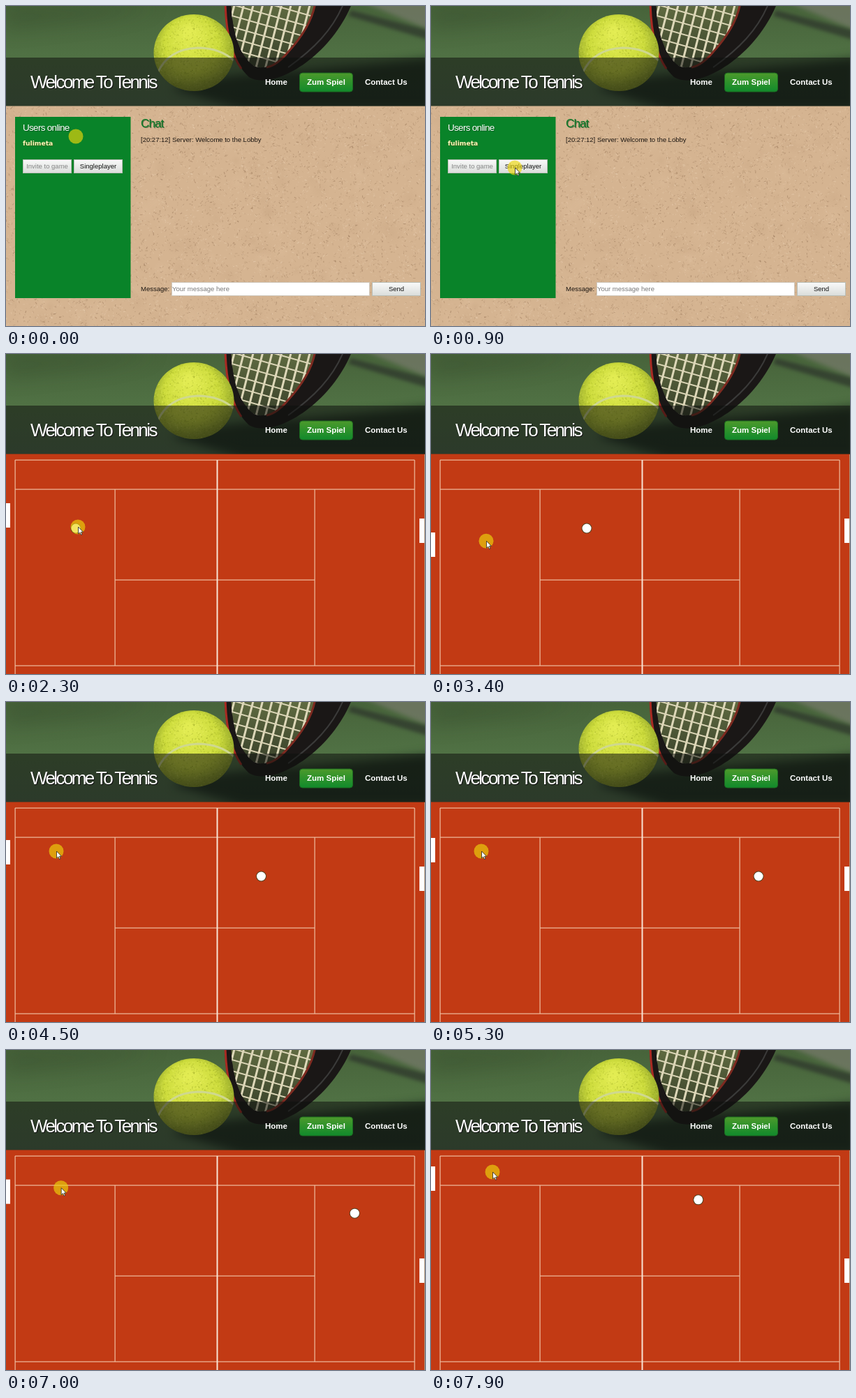
Recreate the animation shown at these times as an HTML page with a canvas. Size 600 by 459 pixels, loop 8000 ms.

```html
<!DOCTYPE html>
<html lang="de">
<head>
<meta charset="utf-8">
<title>Tennis</title>
<style>
html, body { margin: 0; width: 100%; height: 100%; overflow: hidden; }
canvas { display: block; width: 600px; height: 459px; }
</style>
</head>
<body>
<canvas id="stage" width="600" height="459"></canvas>
<script>
const W = 600, H = 459, LOOP = 8000, HEADER = 143.5;
const SANS = '"Liberation Sans", Arial, sans-serif';
const stage = document.getElementById('stage').getContext('2d');

// Seeded random numbers keep the paper grain identical on every load.
let seed = 7;
function random() {
  seed = (seed * 1664525 + 1013904223) % 4294967296;
  return seed / 4294967296;
}

function layer(draw) {
  const canvas = document.createElement('canvas');
  canvas.width = W;
  canvas.height = H;
  draw(canvas.getContext('2d'));
  return canvas;
}

function vertical(c, y0, y1, ...colors) {
  const g = c.createLinearGradient(0, y0, 0, y1);
  colors.forEach((color, i) => g.addColorStop(i / (colors.length - 1), color));
  return g;
}

function rect(c, x, y, w, h, fill) {
  c.fillStyle = fill;
  c.fillRect(x, y, w, h);
}

function disc(c, x, y, r, fill) {
  c.fillStyle = fill;
  c.beginPath();
  c.arc(x, y, r, 0, Math.PI * 2);
  c.fill();
}

function line(c, x0, y0, x1, y1) {
  c.beginPath();
  c.moveTo(x0, y0);
  c.lineTo(x1, y1);
  c.stroke();
}

function shape(c, path, fill) {
  c.fillStyle = fill;
  c.fill(new Path2D(path));
}

function curve(c, path, color, width) {
  c.strokeStyle = color;
  c.lineWidth = width;
  c.stroke(new Path2D(path));
}

function blurred(c, radius, color, path) {
  c.save();
  c.filter = `blur(${radius}px)`;
  shape(c, path, color);
  c.restore();
}

function text(c, str, x, y, size, color, options = {}) {
  const { weight = 'normal', spacing = 0, align = 'left', shadow, family = SANS } = options;
  c.save();
  c.font = `${weight} ${size}px ${family}`;
  c.letterSpacing = spacing + 'px';
  c.fontKerning = 'normal';
  c.textAlign = align;
  if (shadow) {
    c.fillStyle = shadow;
    c.fillText(str, x + 1, y + 1);
  }
  c.fillStyle = color;
  c.fillText(str, x, y);
  c.restore();
}

function drawRacket(c) {
  const strings = 'M322 -5 C324 35 332 66 352 84 C366 94 387 86 404 66 C426 43 440 18 443 -5 Z';
  shape(c, 'M313 -5 C314 40 324 80 348 102 C380 122 464 76 496 -5 Z', '#1a1716');
  curve(c, 'M314 -5 C315 38 323 70 337 90', '#a82a22', 3);
  curve(c, 'M484 -5 C468 35 440 62 404 88', '#3a3a39', 2);

  c.save();
  c.clip(new Path2D(strings));
  shape(c, strings, vertical(c, 0, 90, '#5f6a40', '#38402a'));
  c.strokeStyle = '#ddd7b8';
  c.lineWidth = 3;
  for (let i = 0; i < 11; i++) line(c, 328 + i * 13.5, -5, 301 + i * 13.5, 100);
  c.lineWidth = 2;
  for (let i = 0; i < 8; i++) line(c, 310, -22 + i * 16, 450, 18 + i * 16);
  c.restore();
  curve(c, 'M443 -5 C439 20 425 43 404 66 C394 78 384 86 373 88', '#7d2a20', 3);
}

function drawPhotoBall(c) {
  const g = c.createRadialGradient(262, 36, 5, 268, 66, 62);
  g.addColorStop(0, '#e2ec52');
  g.addColorStop(0.6, '#ccdb3c');
  g.addColorStop(1, '#94a72b');
  c.save();
  c.fillStyle = g;
  c.beginPath();
  c.ellipse(269, 67, 57.5, 55, 0, 0, Math.PI * 2);
  c.fill();
  c.clip();
  for (let i = 0; i < 1300; i++) {
    const tone = random() < 0.5 ? 'rgba(247,252,125,.2)' : 'rgba(105,125,15,.18)';
    rect(c, 210 + random() * 118, 11 + random() * 113, 1.5, 1.5, tone);
  }
  blurred(c, 9, 'rgba(60,70,20,.35)', 'M205 104 Q265 126 330 88 V130 H205 Z');
  curve(c, 'M217 96 C228 72 247 61 274 60 C296 60 314 66 328 80', '#cfd88f', 3);
  c.restore();
}

const header = layer(c => {
  c.save();
  c.beginPath();
  c.rect(0, 0, W, HEADER);
  c.clip();
  rect(c, 0, 0, W, HEADER, vertical(c, 0, HEADER, '#47633a', '#507144', '#4f6b4b'));
  blurred(c, 14, 'rgba(30,45,25,.2)', 'M0 0 H220 L140 18 L0 34 Z');
  blurred(c, 3, 'rgba(118,122,106,.75)', 'M505 -8 H610 V36 Z');
  blurred(c, 2.5, 'rgba(45,52,44,.7)', 'M494 6 L610 36 V50 L490 14 Z');
  blurred(c, 7, 'rgba(10,20,14,.65)', 'M238 119 C300 92 410 98 610 74 V150 H340 Z');
  drawRacket(c);
  drawPhotoBall(c);
  rect(c, 0, 74, W, 70, 'rgba(14,16,14,.53)');
  c.restore();

  text(c, 'Welcome To Tennis', 35, 118, 26, '#fff', { spacing: -2.6, shadow: '#111' });
  const nav = { weight: 'bold' };
  text(c, 'Home', 371, 113, 11.5, '#fff', nav);
  c.beginPath();
  c.roundRect(420.5, 96, 76, 27, 4);
  c.fillStyle = vertical(c, 96, 123, '#4d9a2c', '#2d922b', '#128a2c');
  c.fill();
  c.strokeStyle = '#1c6a20';
  c.lineWidth = 1;
  c.stroke();
  text(c, 'Zum Spiel', 431, 113, 11.5, '#fff', nav);
  text(c, 'Contact Us', 514, 113, 11.5, '#fff', nav);
});

function drawPaper(c) {
  rect(c, 0, 143, W, H - 143, '#d5b491');
  for (let i = 0; i < 160; i++) {
    const x = random() * W, y = 144 + random() * 315, r = 6 + random() * 12;
    const g = c.createRadialGradient(x, y, 0, x, y, r);
    const rgb = random() < 0.5 ? '234,205,173' : '185,150,116';
    g.addColorStop(0, `rgba(${rgb},.14)`);
    g.addColorStop(1, `rgba(${rgb},0)`);
    disc(c, x, y, r, g);
  }
  for (let i = 0; i < 8500; i++) {
    const x = random() * W, y = 144 + random() * 315;
    const angle = random() * 6.3, size = 0.7 + random() * 3;
    c.strokeStyle = random() < 0.6
      ? `rgba(125,92,64,${0.1 + random() * 0.3})`
      : `rgba(240,217,190,${0.2 + random() * 0.3})`;
    c.lineWidth = 0.6 + random() * 0.6;
    line(c, x, y, x + Math.cos(angle) * size, y + Math.sin(angle) * size);
  }
}

function drawButton(c, label, x, y, w, color) {
  rect(c, x, y, w, 20, vertical(c, y, y + 20, '#fafafa', '#d9dcda'));
  c.strokeStyle = '#b9beb7';
  c.lineWidth = 1;
  c.strokeRect(x + 0.5, y + 0.5, w - 1, 19);
  text(c, label, x + w / 2, y + 13, 9.5, color, { align: 'center' });
}

const lobby = layer(c => {
  drawPaper(c);
  rect(c, 13, 159, 165.5, 260, '#098329');
  text(c, 'Users online', 24, 178.5, 13.5, '#fff', { spacing: -0.7, shadow: '#075d1f' });
  text(c, 'fulimeta', 24, 200, 9.2, '#fbf6bb',
    { weight: 'bold', shadow: '#3c6a1c', family: '"DejaVu Sans", Verdana, sans-serif' });
  drawButton(c, 'Invite to game', 24, 220, 70, '#858585');
  drawButton(c, 'Singleplayer', 97, 220, 70, '#111');

  text(c, 'Chat', 193, 174, 17, '#0b7a28', { spacing: -0.9, shadow: 'rgba(40,75,35,.7)' });
  text(c, '[20:27:12] Server: Welcome to the Lobby', 193, 195, 9.5, '#1d1712');
  text(c, 'Message:', 193, 409, 9.5, '#1d1712');
  rect(c, 237, 396, 284, 20, '#fff');
  c.strokeStyle = '#cfc8bd';
  c.strokeRect(237.5, 396.5, 283, 19);
  text(c, 'Your message here', 238, 409, 9.5, '#777');
  drawButton(c, 'Send', 524, 396, 70, '#111');
  c.drawImage(header, 0, 0);
});

const redPage = layer(c => {
  rect(c, 0, 143, W, H - 143, '#d02f16');
  c.drawImage(header, 0, 0);
});

const court = layer(c => {
  rect(c, 0, 143, W, H - 143, '#c23a14');
  rect(c, 599, 144, 1, H - 144, '#a99077');
  const paint = '#efbd9f';
  for (const y of [152, 194, 447]) rect(c, 13, y - 0.5, 572, 1.2, paint);
  for (const x of [13, 585]) rect(c, x - 0.5, 152, 1.2, 307, paint);
  for (const x of [156, 442]) rect(c, x - 0.5, 194, 1.2, 253, paint);
  rect(c, 156, 323.5, 286, 1.2, paint);
  rect(c, 301.5, 152, 2, 307, '#f8e2d3');
  c.drawImage(header, 0, 0);
});

// Interpolates rows of [time, value, value...].
function track(rows, t) {
  const next = rows.findIndex(row => row[0] > t);
  if (next < 0) return rows[rows.length - 1].slice(1);
  if (next === 0) return rows[0].slice(1);
  const a = rows[next - 1], b = rows[next];
  const p = (t - a[0]) / (b[0] - a[0]);
  return a.slice(1).map((v, i) => v + (b[i + 1] - v) * p);
}

const CURSOR = [
  [0, 100, 187], [200, 104, 196], [800, 120, 232], [2000, 120, 232], [2300, 103, 248],
  [2900, 86, 276], [3300, 80, 276], [4100, 72, 214], [6500, 72, 214], [7700, 88, 175]
];
const LEFT_PADDLE = [
  [2200, 214], [2300, 214], [3000, 256], [3400, 256], [4300, 198],
  [4500, 198], [4900, 195], [6600, 195], [7800, 167]
];
const RIGHT_PADDLE = [[6250, 236], [6500, 299]];
const SERVE = 2450, HIT = 6265;

function ballAt(t) {
  if (t < HIT) return [100 + 0.1295 * Math.max(0, t - SERVE), 250];
  return [594.5 - 0.1295 * (t - HIT), 250 - 0.0215 * (t - HIT)];
}

function drawGame(t) {
  rect(stage, 0, track(LEFT_PADDLE, t)[0], 6, 35, '#fff');
  rect(stage, 592, track(RIGHT_PADDLE, t)[0], 7, 35, '#fff');
  const [x, y] = ballAt(t);
  disc(stage, x, y, 7.5, '#554322');
  disc(stage, x, y, 6.5, '#fff');
}

function drawCursor(t) {
  const [x, y] = track(CURSOR, t);
  disc(stage, x, y, 10.5, 'rgba(236,213,10,.65)');
  if (t < 200) return;
  stage.save();
  stage.translate(x, y);
  const arrow = 'M0.5 0 V10 L2.8 7.9 L4.5 11.5 L6 10.8 L4.5 7.3 H7.5 Z';
  shape(stage, arrow, '#fff');
  curve(stage, arrow, '#222', 0.8);
  stage.restore();
}

function render(t) {
  const page = t < 1300 ? lobby : t < 1800 ? redPage : court;
  stage.drawImage(page, 0, 0);
  if (t >= 2200) drawGame(t);
  drawCursor(t);
}

const start = performance.now();
function tick() {
  const t = (performance.now() - start) % LOOP;
  render(Math.floor(t / 100) * 100);
  requestAnimationFrame(tick);
}
tick();
</script>
</body>
</html>
```
